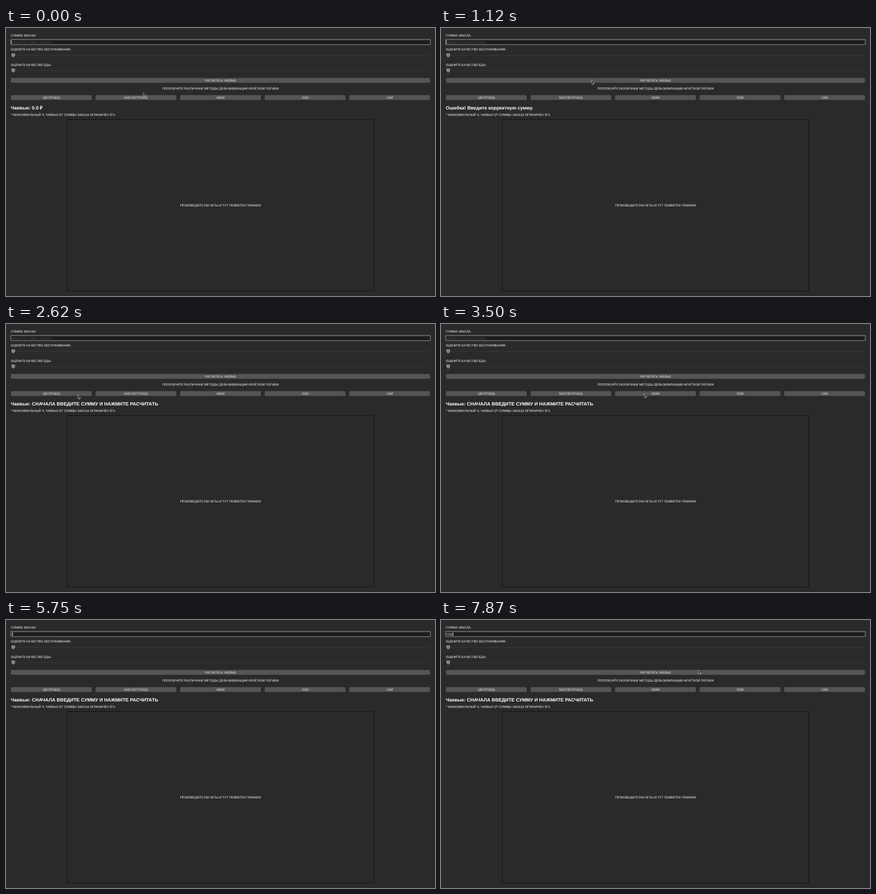
An HTML page that plays this animation: 800x500 px, repeating every 8000 ms.

```html
<!DOCTYPE html>
<html lang="ru">
<head>
<meta charset="utf-8">
<style>
  html, body { margin: 0; width: 100%; height: 100%; overflow: hidden; background: #2a2a2a; }
  svg { display: block; }
  text { font: 5.85px Inter, sans-serif; letter-spacing: -.13px; fill: #f4f4f4; text-rendering: geometricPrecision; white-space: pre; }
  .mid text, text.mid { text-anchor: middle; }
  #buttons rect { fill: #555; }
  #buttons rect.down { fill: #757575; }
  #buttons text { fill: #e2e2e2; }
  #result { font: bold 8.85px "Liberation Sans", Arial, sans-serif; letter-spacing: 0; fill: #fff; }
</style>
</head>
<body>
<svg width="800" height="500" viewBox="0 0 800 500">
  <rect width="800" height="500" fill="#2a2a2a"/>
  <text x="9" y="15.8">СУММА ЗАКАЗА:</text>
  <rect x="8.8" y="21.6" width="782.6" height="9.4" rx="1" fill="#1d1d1d" stroke="#707070" stroke-width="1.6"/>
  <text id="amount" x="10" y="28.5"></text>
  <rect id="caret" y="23" width=".8" height="7" fill="#ddd"/>

  <text x="9" y="42.1">ОЦЕНИТЕ КАЧЕСТВО ОБСЛУЖИВАНИЯ:</text>
  <text x="9" y="70.6">ОЦЕНИТЕ КАЧЕСТВО ЕДЫ:</text>
  <g id="slider">
    <path d="M10 51H790" stroke="#353535" stroke-width="1.4"/>
    <path d="M10.9 47.2h5.2q.9 0 .9.9v3.8L13.5 55.2 10 51.9v-3.8q0-.9.9-.9z" fill="#858585"/>
  </g>
  <use href="#slider" y="28.4"/>

  <g id="buttons" class="mid"></g>
  <text class="mid" x="400" y="114.8">ПОПРОБУЙТЕ РАЗЛИЧНЫЕ МЕТОДЫ ДЕФАЗИФИКАЦИИ НЕЧЕТКОЙ ЛОГИКИ</text>
  <text id="result" x="9" y="151.9"></text>
  <text x="9" y="164.2">* МАКСИМАЛЬНЫЙ % ЧАЕВЫХ ОТ СУММЫ ЗАКАЗА ОГРАНИЧЕН 15%</text>
  <rect x="114.5" y="170.5" width="571" height="320" fill="none" stroke="#121212"/>
  <text class="mid" x="400" y="332.8">ПРОИЗВЕДИТЕ РАСЧЕТЫ И ТУТ ПОЯВЯТСЯ ГРАФИКИ</text>

  <path id="arrow" d="M0 0V7.2L1.7 5.7 2.8 8.3 3.9 7.8 2.8 5.3H5.2Z" fill="#141414" stroke="#d0d0d0" stroke-width=".7"/>
  <path id="beam" d="M-1.5-4Q0-4 0-3Q0-4 1.5-4M0-3V3M-1.5 4Q0 4 0 3Q0 4 1.5 4" fill="none" stroke="#d0d0d0" stroke-width=".8"/>
</svg>
<script>
const LOOP = 8000, STEP = 125;
const $ = id => document.getElementById(id);

// Pointer stops: [step, x, y]
const stops = [
  [0, 256, 120.5], [4, 281, 97.3], [9, 281, 97.3], [14, 243, 129], [17, 238, 129],
  [20, 136, 131], [21, 134, 132.3], [22, 126, 134], [23, 126, 134], [28, 379, 130],
  [31, 379, 130], [36, 287, 41], [38, 291, 30.5], [39, 298, 24], [42, 293, 26.5],
  [58, 293, 26.5], [59, 305, 29], [62, 490, 92], [63, 480, 93]
];
// Step at which each button is held: [step, button index]
const presses = [[5, 0], [8, 0], [16, 2], [22, 1], [29, 3]];
const results = [
  [0, 'Чаевые: 0.0 ₽'],
  [6, 'Ошибка! Введите корректную сумму.'],
  [17, 'Чаевые: СНАЧАЛА ВВЕДИТЕ СУММУ И НАЖМИТЕ РАСЧИТАТЬ']
];
const amounts = [[0, ''], [46, '1'], [47, '12'], [51, '125'], [54, '1250']];

const latest = (list, k) => list.filter(([at]) => at <= k).pop();

function addButton(x, y, width, label) {
  $('buttons').innerHTML +=
    `<rect x="${x}" y="${y}" width="${width}" height="9" rx="2"/>` +
    `<text x="${x + width / 2}" y="${y + 6.6}">${label}</text>`;
}
addButton(9.3, 93.2, 781.4, 'РАСЧИТАТЬ ЧАЕВЫЕ');
['ЦЕНТРОИД', 'БИССЕКТРОИД', 'MOM', 'SOM', 'LOM'].forEach((label, i) =>
  addButton(9.3 + i * 157.7, 125.2, 150.6, label));
const buttons = document.querySelectorAll('#buttons rect');

function pointerAt(k) {
  const a = latest(stops, k);
  const b = stops.find(([at]) => at > k) || a;
  const p = (k - a[0]) / (b[0] - a[0] || 1);
  const e = p * p * (3 - 2 * p);
  return [a[1] + (b[1] - a[1]) * e, a[2] + (b[2] - a[2]) * e];
}

function draw(t) {
  const k = Math.floor((t + 5) / STEP) % (LOOP / STEP);

  const [typedAt, amount] = latest(amounts, k);
  $('amount').textContent = amount || 'ВВЕДИТЕ СУММУ ЗАКАЗА';
  $('amount').style.fill = amount ? '#f4f4f4' : '#4c4c4c';
  const sinceBlink = amount ? k - typedAt : k + 2;
  $('caret').style.opacity = +(sinceBlink % 8 < 4);
  $('caret').setAttribute('x', 9.6 + (amount ? $('amount').getComputedTextLength() : 0));

  $('result').textContent = latest(results, k)[1];
  buttons.forEach((button, i) =>
    button.classList.toggle('down', presses.some(([at, index]) => at === k && index === i)));

  const [x, y] = pointerAt(k);
  const visible = k < 46 || k > 58;
  const overField = y > 21 && y < 31;
  for (const id of ['arrow', 'beam']) {
    $(id).setAttribute('transform', `translate(${x} ${y})`);
    $(id).style.opacity = +(visible && overField === (id === 'beam'));
  }
}

const start = performance.now();
(function tick() {
  draw((performance.now() - start) % LOOP);
  requestAnimationFrame(tick);
})();
</script>
</body>
</html>
```
